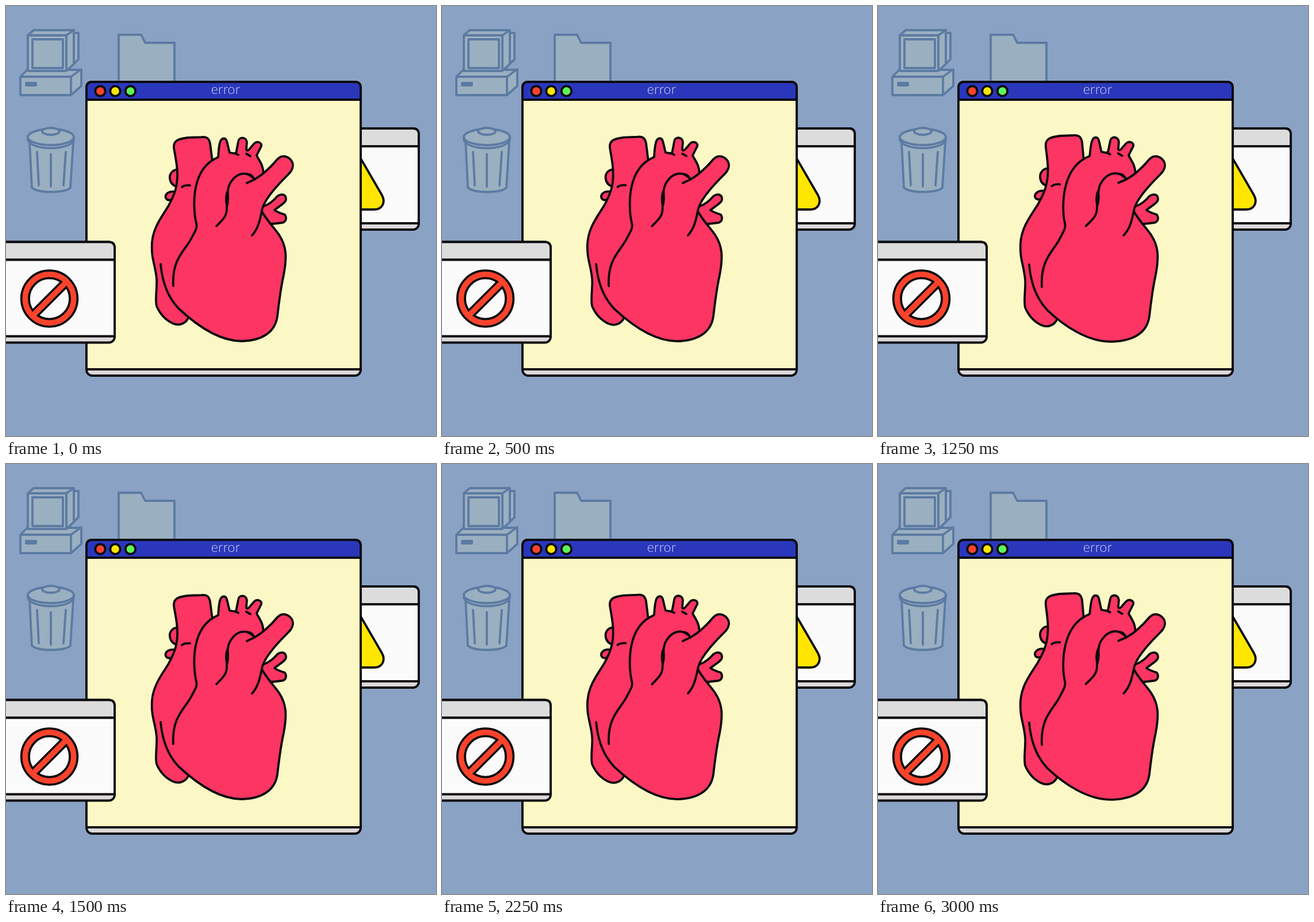
An HTML page for the animation above (3250 ms loop, 748x748 px).

```html
<!DOCTYPE html>
<html lang="en">
<head>
<meta charset="utf-8">
<title>Error</title>
<style>
  html, body { margin: 0; width: 100%; height: 100%; overflow: hidden; background: #8aa2c4; }
  svg { display: block; width: 100vw; height: 100vh; }
  .icon { fill: #9aafc0; stroke: #5c7ba3; }
  .line { fill: none; }
  text { font: 300 23px Lato, Inter, sans-serif; letter-spacing: .4px; fill: #d4d7f4; stroke: none; text-anchor: middle; }
</style>
</head>
<body>
<svg viewBox="0 0 748 748" stroke="#0c0b0d" stroke-width="3.8" stroke-linejoin="round" stroke-linecap="round">
  <g class="icon">
    <path d="M118,47 H126 V93 L116,102 Z"/>
    <path d="M38,51 L48,42 H118 V101 L105,113 H38 Z M38,51 H105 V113 M105,51 L118,42"/>
    <path d="M25,123 L37,111 H131 V139 L113,155 H25 Z M25,123 H113 V155 M113,123 L131,110"/>
    <path d="M38,51 H105 V113 H38 Z M46,58 H99 V108 H46 Z"/>
    <path d="M35,134 H52 V138 H35 Z" fill="#5c7ba3"/>
    <path d="M196,145 V50 H235 L242,64 H293 V145 Z"/>
    <path d="M41,236 L45,316 C56,326 102,326 112,316 L117,236 Z"/>
    <path d="M38,227 V233 C44,252 112,252 118,233 V227 Z"/>
    <ellipse cx="78" cy="228" rx="40" ry="14"/>
    <ellipse cx="78" cy="218" rx="15" ry="6"/>
    <path d="M54,254 L57,312 M78,258 V314 M104,254 L100,312"/>
  </g>
  <g id="right"></g>
  <path d="M600,236 L618,267 L654,329 C661,342 654,354 641,354 H600 Z" fill="#fee600"/>
  <g id="main"></g>
  <circle cx="164" cy="148" r="8.7" fill="#f9432e"/>
  <circle cx="190" cy="148" r="8.7" fill="#fce500"/>
  <circle cx="216.5" cy="148" r="8.7" fill="#5df75a"/>
  <text x="382" y="153">error</text>
  <g id="heart" fill="#fd3563"></g>
  <g id="left"></g>
  <g class="line" stroke-linecap="butt">
    <path d="M46,539 L106,479" stroke-width="16.5"/>
    <circle cx="75.5" cy="509" r="42.2" stroke-width="17"/>
    <g stroke="#fb432c" stroke-width="9.5">
      <path d="M46,539 L106,479"/>
      <circle cx="75.5" cy="509" r="42.2"/>
    </g>
  </g>
</svg>
<script>
const $ = id => document.getElementById(id);

function drawWindow(id, x, y, w, h, bar, body) {
  const bodyH = h - 42;
  $(id).innerHTML = `
    <rect x="${x}" y="${y}" width="${w}" height="${h}" rx="10" fill="#dcd8da"/>
    <path d="M${x},${y + 31} v-21 q0,-10 10,-10 h${w - 20} q10,0 10,10 v21 z" fill="${bar}"/>
    <rect x="${x}" y="${y + 31}" width="${w}" height="${bodyH}" fill="${body}"/>`;
}
drawWindow('right', 500, 213, 218, 176, '#dcdcdc', '#fbfbfb');
drawWindow('main', 140, 132, 477, 511, '#2a37bc', '#fcf8c5');
drawWindow('left', -40, 410.5, 229, 175, '#dcdcdc', '#fbfbfb');

// Heart layers from back to front, in absolute x,y pairs
const layers = [
  // stubs behind the left side
  ['M299,285 C290,284 284,292 285,300 C286,308 291,313 299,315'],
  ['M292,323 C281,322 276,329 278,334 C280,338 284,339 290,336'],
  // left side with the upper vein
  ['M317,543 C312,553 300,557 290,552 C277,546 268,536 262,522 C259,510 263,492 262,475 ' +
   'C260,450 252,440 254,411 C256,385 272,365 283,347 C292,330 299,315 298,290 ' +
   'C298,275 293,255 292,246 C291,233 302,231 316,229 L340,228 C349,227 353,230 355,239 L359,270'],
  ['M340,300 L440,300 L440,420 L300,480 Z', 'stroke="none"'],
  // forked vein on the right
  ['M440,352 L449,348 C458,345 466,338 472,331 C479,325 488,328 487,337 C486,343 474,349 467,355 ' +
   'C474,360 480,361 485,363 C489,369 487,376 480,377 L455,380'],
  // ventricles
  ['M269,449 C272,482 282,507 300,526 C330,554 370,583 410,583 C445,582 468,568 472,540 ' +
   'C476,505 478,490 483,468 C489,436 488,418 475,398 C465,384 453,372 445,357'],
  // aorta with three branches
  ['M291,487 C288,440 312,425 322,405 C330,390 333,386 331,378 C327,362 326,335 330,316 ' +
   'C335,290 348,272 369,263 C370,252 370,242 373,235 C376,229 382,229 384,235 ' +
   'C386,242 387,248 389,255 L400,257 L404,236 C405,227 418,227 419,237 L418,250 ' +
   'C420,253 423,250 425,247 L432,239 C437,234 446,238 444,244 L436,260 C441,270 447,275 448,292'],
  // pulmonary trunk
  ['M419,308 C432,302 440,298 450,289 C458,282 464,276 469,270 C476,261 484,258 494,266 ' +
   'C502,274 500,284 491,293 C478,306 452,332 446,352 C443,364 441,385 428,399'],
  ['M366,383 C379,370 385,364 384,350 C387,338 383,322 389,310 C397,295 408,290 418,292 C426,293 430,297 432,302',
   'class="line"'],
  ['M384,352 C380,338 381,326 386,318 C388,330 389,342 384,352 Z M414,292 C424,289 432,294 432,302 C427,299 423,294 414,292 Z',
   'fill="#0c0b0d" stroke-width="1"'],
  ['M306,315 C311,311 315,312 320,312 M398,256 L404,259 M418,257 L425,261', 'class="line"'],
];
$('heart').innerHTML = layers.map(([, attrs = '']) => `<path ${attrs}/>`).join('');
const paths = [...$('heart').children];

const clamp = (v, lo = 0, hi = 1) => Math.min(hi, Math.max(lo, v));

// Swells the left and right halves by amounts from 0 to 1
function warp(x, y, left, right) {
  const l = left * clamp((440 - x) / 100);
  const r = right * clamp((x - 320) / 150) * clamp((y - 285) / 60);
  const low = clamp((y - 443) / 140);
  const lift = y < 443 ? -4 * clamp((443 - y) / 70) : 3 * low;
  const dx = r * (7 - 3 * low) - 6 * l * clamp((y - 240) / 120);
  const dy = r * lift + 3 * l * clamp((y - 400) / 150, -1);
  return (x + dx).toFixed(2) + ',' + (y + dy).toFixed(2);
}

const LOOP = 3250, STEP = 250, BEAT = 875;

function draw() {
  const t = Math.floor(performance.now() % LOOP / STEP) * STEP;
  const p = (t - STEP + BEAT) % BEAT;
  const right = clamp(1 - p / 125);
  const left = p < 125 ? p / 125 : clamp((270 - p) / 145);
  paths.forEach((path, i) => path.setAttribute('d',
    layers[i][0].replace(/(\d+),(\d+)/g, (_, x, y) => warp(+x, +y, left, right))));
  requestAnimationFrame(draw);
}
draw();
</script>
</body>
</html>
```
